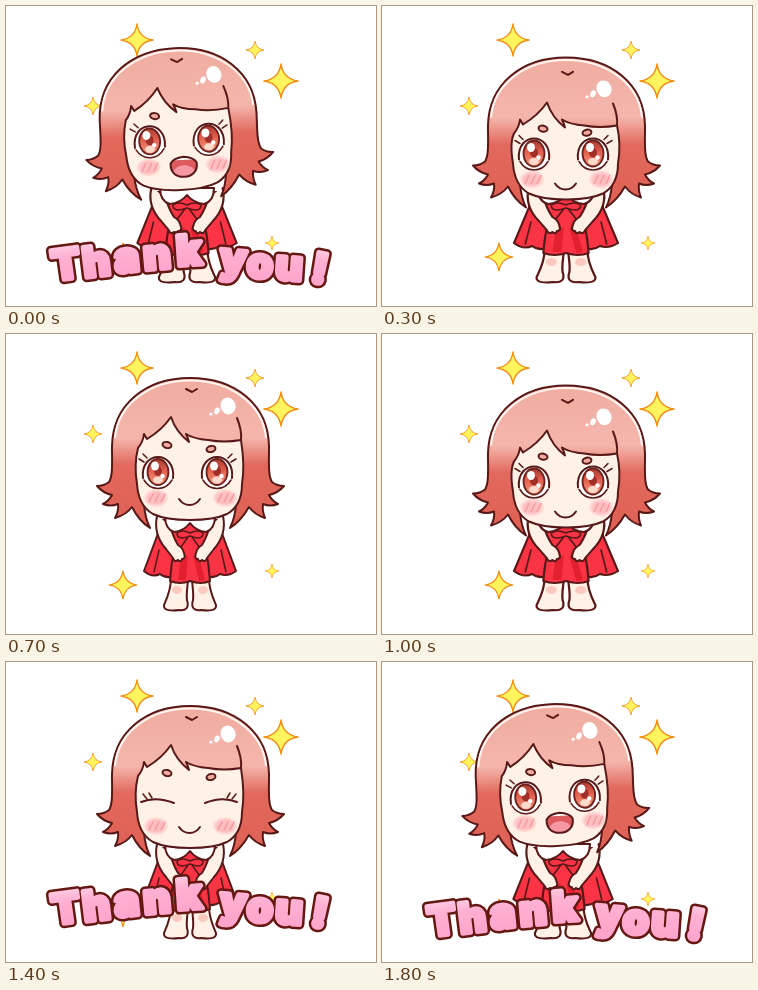
Animation of 370 by 300 pixels, one loop 2 s. Source, as an HTML page:

```html
<!DOCTYPE html>
<html lang="en">
<head>
<meta charset="utf-8">
<title>Thank you!</title>
<style>
  html, body { margin: 0; width: 100%; height: 100%; overflow: hidden; background: #fff; }
  svg { display: block; width: 370px; height: 300px; }
  .line { fill: none; stroke: #561917; stroke-width: 2; stroke-linecap: round; stroke-linejoin: round; }
  .thin { stroke-width: 1.5; }
  .skin { fill: #fff1e6; }
  .red { fill: #fb3445; }
  .deep { fill: #e3202f; }
  .hair { fill: url(#hair); }
  .white { fill: #fff; }
  .star { fill: #fff45e; stroke: #f08f1a; stroke-width: 1.4; stroke-linejoin: round; }
  .word { font: 900 42px Inter, "Noto Sans", sans-serif; text-anchor: middle; stroke-linejoin: round; }
  .rim { fill: #651712; stroke: #651712; stroke-width: 9.5; }
  .fill { fill: url(#candy); stroke: url(#candy); stroke-width: 4.5; }
</style>
</head>
<body>
<svg viewBox="0 0 370 300">
  <defs>
    <linearGradient id="hair" gradientUnits="userSpaceOnUse" x1="0" y1="44" x2="0" y2="194">
      <stop offset="0" stop-color="#f0aca1"/>
      <stop offset=".4" stop-color="#f4b6ab"/>
      <stop offset=".58" stop-color="#e2695d"/>
      <stop offset="1" stop-color="#df6054"/>
    </linearGradient>
    <linearGradient id="iris" x1="0" y1="0" x2="0" y2="1">
      <stop offset="0" stop-color="#a83a30"/>
      <stop offset=".45" stop-color="#e2604f"/>
      <stop offset="1" stop-color="#f79b82"/>
    </linearGradient>
    <linearGradient id="candy" gradientUnits="userSpaceOnUse" x1="0" y1="-33" x2="0" y2="2">
      <stop offset="0" stop-color="#ffc9e0"/>
      <stop offset=".3" stop-color="#ffb0d3"/>
      <stop offset="1" stop-color="#ffa5cc"/>
    </linearGradient>
    <radialGradient id="blush">
      <stop offset=".6" stop-color="#fdbfc1"/>
      <stop offset="1" stop-color="#fdbfc1" stop-opacity="0"/>
    </radialGradient>
    <clipPath id="stage"><rect width="370" height="285"/></clipPath>
    <path id="lips" d="M-13 -4Q-10 -9 0 -10Q10 -9 13 -4C14 5 8 10 0 10C-8 10 -14 5 -13 -4Z"/>
    <clipPath id="inside"><use href="#lips"/></clipPath>

    <g id="eye">
      <ellipse class="white" rx="16" ry="16.5"/>
      <ellipse rx="10.5" ry="13" fill="url(#iris)" stroke="#6b211c" stroke-width="1.8"/>
      <ellipse cy="-1" rx="4" ry="5" fill="#a12f29"/>
      <ellipse class="white" cx="-3" cy="-6" rx="4" ry="4.5"/>
      <ellipse cy="8" rx="5" ry="3.5" fill="#ffd9cc"/>
      <circle class="white" cx="4.5" cy="4" r="2.2"/>
      <path class="line" stroke-width="3" d="M-15 6C-18 -22 18 -22 15 6"/>
      <path class="line thin" d="M-14 8Q-9 16.5 0 16.5Q9 16.5 14 8"/>
    </g>
    <g id="cheek">
      <ellipse rx="13" ry="9.5" fill="url(#blush)"/>
      <path d="M-7 4L-3 -4M-1 4L3 -4M5 4L9 -4" fill="none" stroke="#f4979c" stroke-width="1.3" stroke-linecap="round"/>
    </g>
    <ellipse id="brow" class="line hair" rx="4.5" ry="3"/>
    <g id="leg">
      <path class="line skin" d="M165 244C165 256 161 264 158 271C157 277 166 277 173 276C181 277 183 273 181 266C180 258 182 252 182 244Z"/>
      <ellipse cx="171" cy="256" rx="5" ry="4" fill="#fcc9bf"/>
    </g>
    <path id="arm" class="line skin" d="M151 182C148 196 153 207 160 215L167 224Q169 229 172 226Q175 229 176 225Q180 225 178 219Q177 214 172 211Q167 203 164 191"/>
  </defs>

  <g clip-path="url(#stage)">
    <g id="stars"></g>
    <g id="body">
      <use href="#leg"/>
      <use href="#leg" transform="translate(368) scale(-1 1)"/>
      <path class="line red" d="M157 186L138 237Q146 244 154 240Q160 245 168 242L201 242Q208 245 214 240Q222 243 230 237L211 186Z"/>
      <path class="line red" d="M169 212Q165 230 164 247Q174 251 184 247Q195 251 204 247Q203 230 199 212"/>
      <path class="deep" d="M175 222L172 246L180 246L182 222ZM187 222L193 247L199 246L193 222Z"/>
      <path class="line thin" d="M153 216L148 238M215 216L220 238"/>
      <use href="#arm"/>
      <use href="#arm" transform="translate(368) scale(-1 1)"/>
      <path class="line white" d="M159 182Q159 195 168 198Q178 197 184 189Q190 197 200 198Q209 195 209 182Z"/>
      <path class="line thin red" d="M184 199Q176 195 171 199Q171 207 184 202Q197 207 197 199Q192 195 184 199ZM182 203L175 213M186 203L193 213"/>
    </g>

    <g id="head">
      <path class="line hair" d="M184 44C140 44 107 70 106 112C106 128 107 142 103 148Q98 152 91 152Q97 159 106 161Q103 167 97 170Q105 173 112 170Q113 177 109 184Q120 181 126 173Q133 187 144 194Q139 184 138 170L230 170Q229 184 224 194Q235 187 243 173Q249 181 259 184Q256 177 257 170Q264 173 272 170Q266 167 263 161Q272 159 278 152Q271 152 266 148C262 142 263 128 263 112C262 70 229 44 184 44Z"/>
      <path d="M109 104C112 69 145 46.5 184 46.5C223 46.5 257 69 260 104" fill="none" stroke="#fff4ef" stroke-width="2"/>
      <path id="face" class="line skin"/>
      <g id="crown">
        <path class="line" d="M180 55L186 58L191 55"/>
        <ellipse class="white" cx="222" cy="72" rx="7.5" ry="8.5" transform="rotate(-20 222 72)"/>
        <ellipse class="white" cx="211" cy="77" rx="2.6" ry="3.6" transform="rotate(25 211 77)"/>
        <circle class="white" cx="205" cy="80" r="1.6"/>
      </g>
      <g id="brows">
        <use href="#brow" transform="translate(161 111) rotate(12)"/>
        <use id="rightBrow" href="#brow" transform="translate(205 115) rotate(-12)"/>
      </g>
      <g id="features">
        <use href="#cheek" x="150" y="164"/>
        <use href="#cheek" x="219" y="164"/>
        <g id="open">
          <use href="#eye" x="152" y="138"/>
          <use href="#eye" x="211" y="138"/>
          <path class="line thin" d="M138 128L133 125M141 124L137 120M225 128L230 125M222 124L226 120"/>
        </g>
        <g id="shut">
          <path class="line" stroke-width="3" d="M135 140Q150 134 168 141M199 141Q216 134 231 140"/>
          <path class="line thin" d="M141 137L137 132M146 136L143 131M226 137L230 132M221 136L224 131"/>
        </g>
        <path id="smile" class="line" d="M173 165Q177 171 183.500 171Q190 171 194 165"/>
        <g id="mouth">
          <g clip-path="url(#inside)">
            <rect x="-15" y="-12" width="30" height="24" fill="#dd5a5e"/>
            <ellipse cy="6" rx="11" ry="7.5" fill="#f698a4"/>
            <rect class="white" x="-15" y="-12" width="30" height="5"/>
          </g>
          <use href="#lips" class="line"/>
        </g>
      </g>
    </g>
    <g id="words"></g>
  </g>
</svg>

<script>
const $ = id => document.getElementById(id);
const move = (id, value) => $(id).setAttribute('transform', value);
const show = (id, on) => { $(id).style.display = on ? '' : 'none'; };

// x, y, radius in each of the two twinkle states
const stars = [
  [131, 34, 16, 8], [249, 44, 9, 14], [275, 75, 17, 8],
  [87, 100, 9, 15], [117, 251, 14, 7], [266, 237, 7, 13]
];
// centre x, baseline y, tilt
const letters = [
  ['T', 62, 273, -8], ['h', 92, 270, -7], ['a', 122, 266, -6], ['n', 152, 263, -5], ['k', 184, 259, -4],
  ['y', 226, 267, 5], ['o', 253, 272, 4], ['u', 282, 274, 4], ['!', 311, 277, 11]
];

// head: x, y, angle, width; bangs drop; face fx, fy; smile drop; body shift and width
const upright = { x: 0, y: 0, a: 0, w: 1, bangs: 0, fx: 0, fy: 0, smile: 0, sx: 0, bw: 1 };
const nod = { ...upright, y: 7.5, bangs: 6, fy: 2, smile: 3, bw: 1.13 };
const crouch = { ...upright, y: 20, w: 1.05, bangs: 16, fy: 8, smile: 3, bw: 1.02 };
const lean = { ...upright, x: -9, y: -2, a: -2.5, fx: 3, fy: -2, sx: -3, bw: 1.08 };

function mix(a, b, k) {
  const out = {};
  for (const key in a) out[key] = a[key] + (b[key] - a[key]) * k;
  return out;
}

const nods = [0, .3, .75, 1, .75, .3, .1, 0, .3, .75, 1];
const rise = [39, 4, -12, -5, 3, 1, 0];

function poseAt(n) {
  if (n === 0 || n > 17) return lean;
  if (n < 11) return mix(upright, nod, nods[n]);
  if (n === 11) return mix(nod, crouch, .5);
  if (n === 12) return crouch;
  if (n === 13) return mix(upright, crouch, .3);
  return mix(upright, lean, [0, 0, .35, .75][n - 14]);
}

// forehead edge follows the bangs, jaw stays put
function drawFace(b) {
  const p = (x, y) => `${x} ${y + b} `;
  $('face').setAttribute('d',
    `M131 150C129 138 129 126 ${p(132, 114)}Q${p(137, 108)}${p(138, 100)}L${p(141, 105)}` +
    `Q${p(156, 96)}${p(165, 83)}Q${p(170, 98)}${p(183, 108)}Q${p(182, 104)}${p(180, 100)}` +
    `Q${p(188, 105)}${p(202, 106)}Q${p(218, 109)}${p(235, 106)}Q${p(236, 96)}${p(231, 84)}Q${p(236, 96)}${p(235, 106)}` +
    'C238 125 238 138 236 150C236 165 230 175 221 180C204 188 164 188 147 180C138 175 132 165 131 150Z');
}

function draw(n) {
  const p = poseAt(n);
  const talk = n === 0 || n === 12 || n === 13 || n > 16;
  const shut = n > 13 && n < 17;
  move('head', `translate(${p.x} ${p.y}) rotate(${p.a} 184 190) translate(184.5) scale(${p.w} 1) translate(-184.5)`);
  drawFace(p.bangs);
  move('crown', `translate(0 ${p.bangs * .55})`);
  move('brows', `translate(0 ${p.bangs * .7})`);
  move('features', `translate(${p.fx} ${p.fy})`);
  move('smile', `translate(0 ${p.smile})`);
  move('mouth', n === 12 ? 'translate(184 169) scale(1.25 1.05)' : 'translate(185 165)');
  move('body', `translate(${184 + p.sx}) scale(${p.bw} 1) translate(-184)`);
  show('mouth', talk);
  show('smile', !talk);
  show('rightBrow', !talk);
  show('open', !shut);
  show('shut', shut);

  const alt = n > 0 && n % 4 < 2;
  stars.forEach(([x, y, r, s], i) =>
    $('stars').children[i].setAttribute('transform', `translate(${x} ${y}) scale(${(alt ? s : r) / 16})`));

  show('words', n === 0 || n > 11);
  const lift = rise[n - 12] || 0;
  for (const el of $('words').children) {
    const [, x, y, a] = letters[el.dataset.i];
    el.setAttribute('transform', `translate(${x} ${y + lift}) rotate(${a})`);
  }
}

$('stars').innerHTML = stars.map(() =>
  '<path class="star" d="M0 -16Q2 -2 16 0Q2 2 0 16Q-2 2 -16 0Q-2 -2 0 -16Z"/>').join('');
$('words').innerHTML = ['rim', 'fill'].map(kind =>
  letters.map(([c], i) => `<text class="word ${kind}" data-i="${i}">${c}</text>`).join('')).join('');

let last = -1;
function tick() {
  const n = Math.floor(performance.now() % 2000 / 100);
  if (n !== last) draw(last = n);
  requestAnimationFrame(tick);
}
tick();
</script>
</body>
</html>
```
